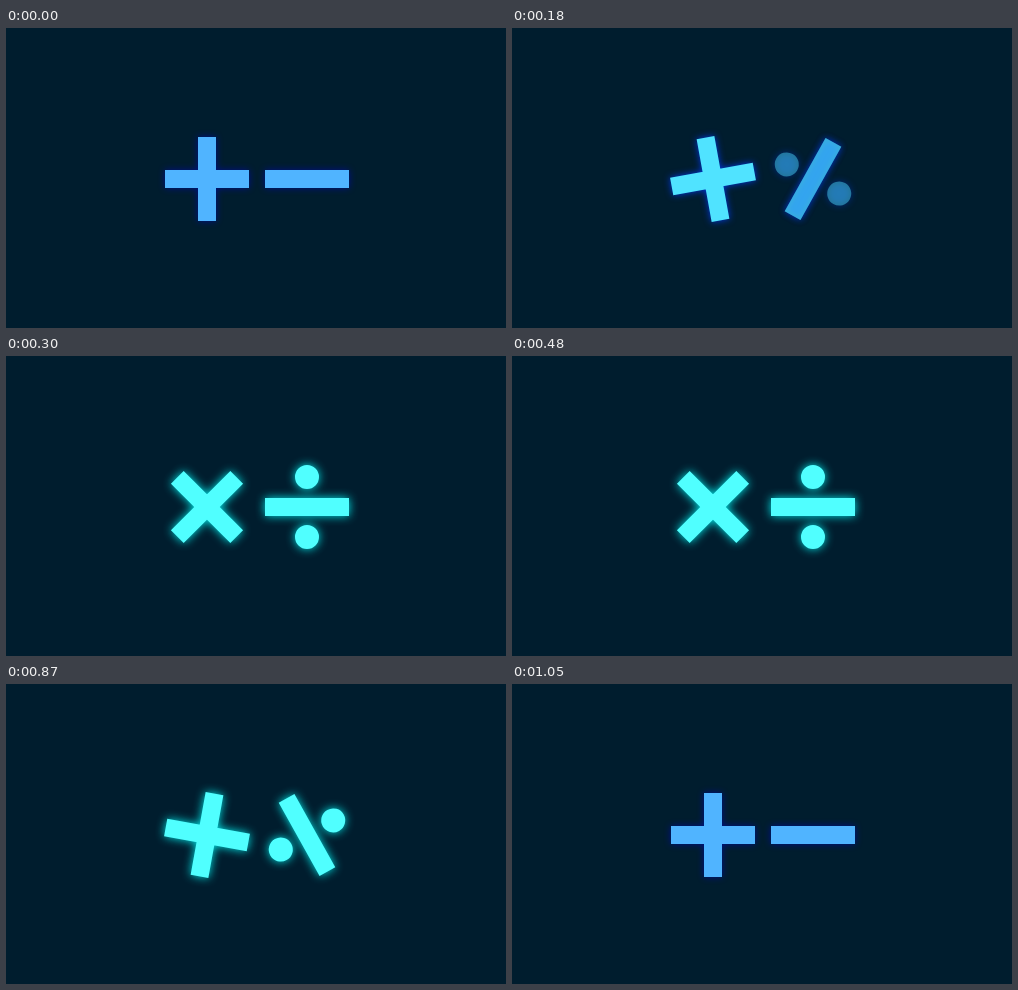
An HTML page with a canvas that plays this animation: 500 px wide and 300 px high, repeating every 1500 ms.

```html
<!DOCTYPE html>
<html>
<head>
<meta charset="utf-8">
<style>
  html, body { margin: 0; width: 100%; height: 100%; overflow: hidden; background: #001d2e; }
  canvas { display: block; }
</style>
</head>
<body>
<canvas id="stage" width="500" height="300"></canvas>
<script>
const ctx = document.getElementById('stage').getContext('2d');
const LOOP = 1500, HALF = 750, STEP = 30, STEPS = 10;
const LENGTH = 84, THICK = 18;

const ramp = (x, from, to) => Math.min(1, Math.max(0, (x - from) / (to - from)));

// Symmetric cubic-bezier(a, 0, 1 - a, 1), solved by bisection
function ease(x, a) {
  let lo = 0, hi = 1;
  for (let i = 0; i < 30; i++) {
    const s = (lo + hi) / 2, r = 1 - s;
    if (3 * a * s * r * r + 3 * (1 - a) * s * s * r + s ** 3 < x) lo = s;
    else hi = s;
  }
  return lo * lo * (3 - 2 * lo);
}

function bar(w, h) {
  ctx.rect(-w / 2, -h / 2, w, h);
}

function dot(y) {
  ctx.moveTo(12, y);
  ctx.arc(0, y, 12, 0, 2 * Math.PI);
}

function minus() {
  bar(LENGTH, THICK);
}

function plus() {
  minus();
  bar(THICK, LENGTH);
}

function divide() {
  minus();
  dot(-30);
  dot(30);
}

function icon(shape, x, degrees, alpha) {
  if (!alpha) return;
  ctx.save();
  ctx.translate(x, 151);
  ctx.rotate(degrees * Math.PI / 180);
  ctx.globalAlpha = alpha;
  ctx.beginPath();
  shape();
  ctx.fill();
  ctx.restore();
}

function draw(time) {
  const t = time % LOOP;
  const back = t >= HALF;
  const k = Math.min(STEPS, Math.floor(t % HALF / STEP));
  const turn = k / STEPS;
  const toward = v => back ? 1 - v : v;

  const cyan = toward(ramp(k, 4, 7.2));
  const fade = toward(ramp(k, 4.7, 7.7));
  const glow = cyan ** 3;
  const strength = 0.45 + 0.45 * Math.max(glow, Math.sin(Math.PI * turn));

  ctx.shadowBlur = 0;
  ctx.shadowColor = 'transparent';
  ctx.fillStyle = '#001d2e';
  ctx.fillRect(0, 0, 500, 300);

  ctx.fillStyle = `rgb(80, ${180 + 75 * cyan}, 255)`;
  ctx.shadowColor = `rgba(0, ${255 * glow}, 255, ${strength})`;
  ctx.shadowBlur = 7 + 3 * glow;

  icon(plus, 201, 315 * (back + ease(turn, 0.82)), 1);
  const spin = 360 * ease(turn, 0.835);
  icon(minus, 301, spin, 1 - fade);
  icon(divide, 301, spin, fade);
}

const start = performance.now();
function tick() {
  draw(performance.now() - start);
  requestAnimationFrame(tick);
}
tick();
</script>
</body>
</html>
```
